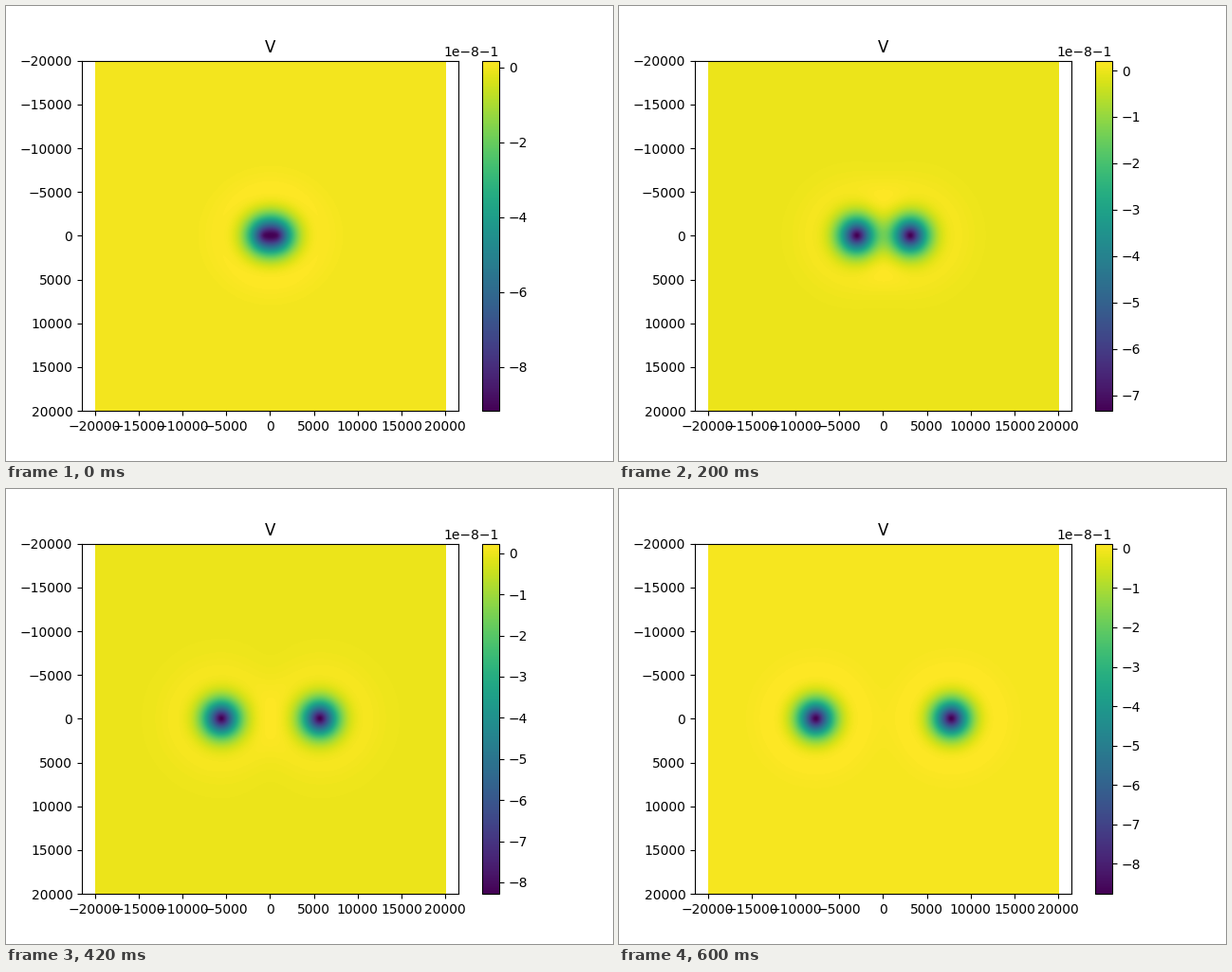
Animation of 640 by 480 pixels, one loop 0.62 s. Source, as a matplotlib script:

```python
import numpy as np
import matplotlib.pyplot as plt
from matplotlib.animation import FuncAnimation

FRAMES, INTERVAL = 31, 20
HALF = 20000      # half width of the map
SCALE = 1100      # radial length scale of one well
GRID = 400


def kelvin_kei(x):
    """Kelvin function kei(x) for x > 0, from its integral form."""
    t = np.linspace(0, 10, 1501)
    phase = np.outer(x, np.cosh(t)) / np.sqrt(2)
    values = -np.exp(-phase) * np.sin(phase)
    return (values.sum(axis=1) - values[:, 0] / 2) * (t[1] - t[0])


# Unit well: -1 at the centre, with a faint raised ring around it.
radii = np.linspace(0, 36, 1801)
profile = np.append(-1, kelvin_kei(radii[1:]) * 4 / np.pi)

step = 2 * HALF / GRID
axis = np.linspace(-HALF + step / 2, HALF - step / 2, GRID)
X, Y = np.meshgrid(axis, axis)


def well(x0):
    return np.interp(np.hypot(X - x0, Y) / SCALE, radii, profile)


def field(k):
    offset = 700 + 234 * k + 120 * np.exp(-k / 2)
    depth = 8.8 * (offset / 7720) ** 0.179 * (1 + 0.045 * np.exp(-k))
    return depth * (well(-offset) + well(offset))


fig, ax = plt.subplots(figsize=(6.4, 4.8), dpi=100)
image = ax.imshow(field(0), cmap="viridis", extent=[-HALF, HALF, HALF, -HALF])
bar = fig.colorbar(image, ax=ax)
ax.axis("equal")
ax.set_title("V")
bar.ax.annotate("1e\u22128\u22121", (1, 1), xycoords="axes fraction",
                xytext=(0, 3), textcoords="offset points",
                ha="right", va="baseline", fontsize=10)


def draw(k):
    values = field(k)
    image.set_data(values)
    image.set_clim(values.min(), values.max())
    return [image]


anim = FuncAnimation(fig, draw, frames=FRAMES, interval=INTERVAL,
                     init_func=lambda: draw(0), repeat=True, blit=False)
plt.show()
```
